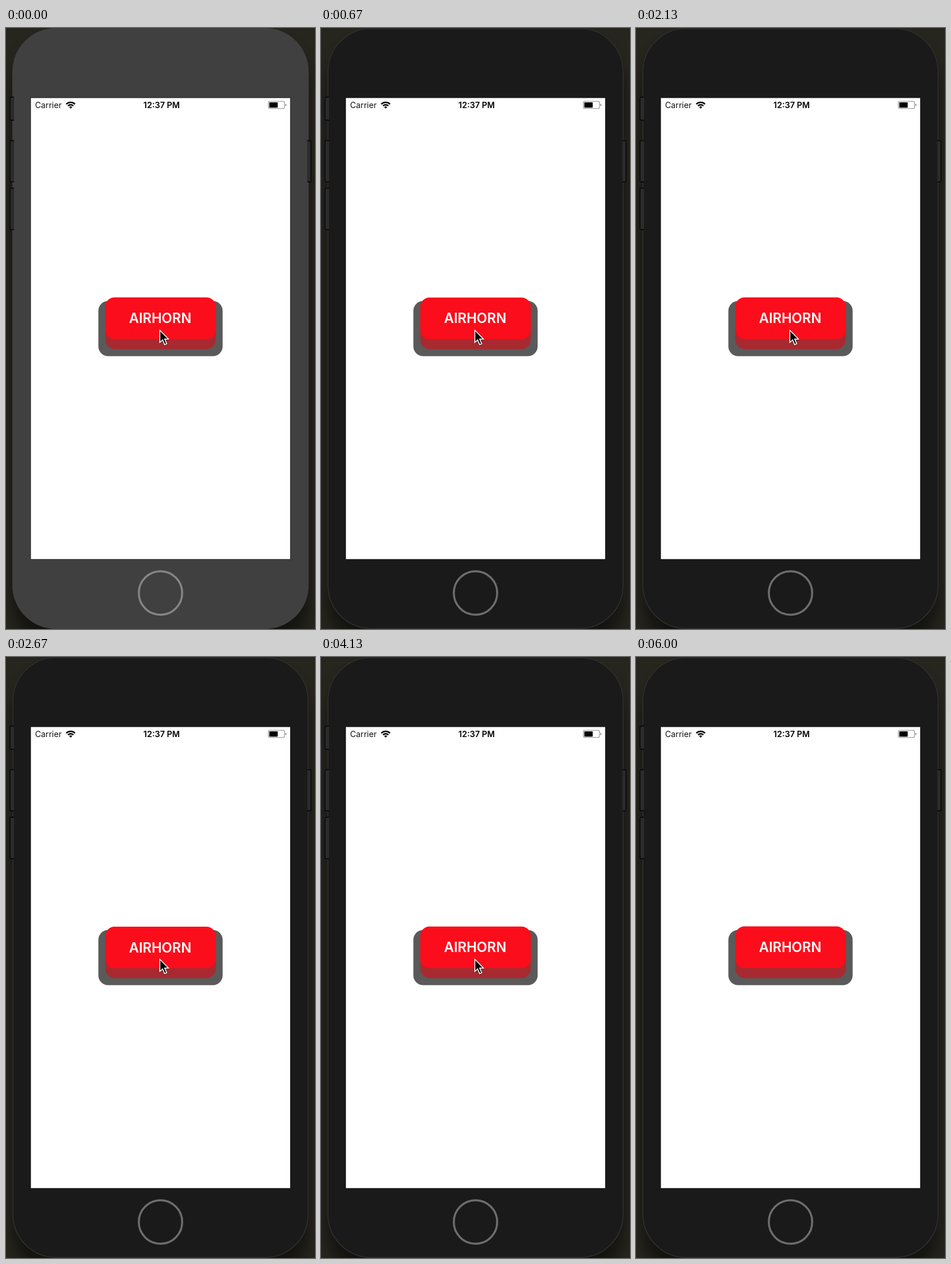
An HTML page for the animation above (6140 ms loop, 537x1043 px).

```html
<!DOCTYPE html>
<html lang="en">
<head>
<meta charset="utf-8">
<title>Airhorn button</title>
<style>
  html, body { margin: 0; width: 100%; height: 100%; overflow: hidden; background: #25241c; }
  svg { display: block; width: 100%; height: 100%; }
  text { font-family: Inter, "Liberation Sans", sans-serif; }
</style>
</head>
<body>
<svg viewBox="0 0 537 1043" xmlns="http://www.w3.org/2000/svg">
  <defs>
    <filter id="soft" x="-10%" y="-10%" width="120%" height="120%"><feGaussianBlur stdDeviation="14"/></filter>
    <filter id="drop" x="-50%" y="-50%" width="200%" height="200%">
      <feDropShadow dx="0" dy="1.2" stdDeviation="1.2" flood-color="#000" flood-opacity=".4"/>
    </filter>
  </defs>

  <rect width="537" height="1043" fill="#27261e"/>
  <rect x="11" y="30" width="515" height="1043" rx="76" fill="#000" opacity=".5" filter="url(#soft)"/>

  <!-- phone body -->
  <rect x="11" y="0" width="515" height="1043" rx="76" fill="#1a1a1a"/>
  <rect x="12" y="1" width="513" height="1041" rx="75" fill="none" stroke="#303030" stroke-width="1.6"/>
  <circle cx="268.5" cy="980.5" r="37.7" fill="none" stroke="#6d6d6d" stroke-width="3.5"/>
  <g id="glow">
    <rect x="11" y="0" width="515" height="1043" rx="76" fill="#404040"/>
    <circle cx="268.5" cy="980.5" r="37.7" fill="none" stroke="#858585" stroke-width="3.5"/>
  </g>
  <g fill="#2b2b2b" stroke="#050505" stroke-width="1.3">
    <path d="M14 120H9q-2 0-2 2v36q0 2 2 2h5"/>
    <path d="M14 195.5H9q-2 0-2 2v67.500q0 2 2 2h5"/>
    <path d="M14 278H9q-2 0-2 2v68q0 2 2 2h5"/>
    <path d="M523.500 195.500h4.500q2 0 2 2v67.500q0 2-2 2h-4.500"/>
  </g>

  <!-- screen and status bar -->
  <rect x="42.500" y="120.500" width="452" height="802" fill="#151515"/>
  <rect x="43.300" y="121.500" width="450.500" height="800.200" fill="#fff"/>
  <text x="50.500" y="138.800" font-size="14.200" fill="#111">Carrier</text>
  <g fill="none" stroke="#000" stroke-width="2.500">
    <path d="M104.800 132.200a10.800 10.800 0 0 1 15.200 0"/>
    <path d="M107.700 135.200a6.700 6.700 0 0 1 9.400 0"/>
  </g>
  <path d="M109.800 137.200a3.900 3.900 0 0 1 5.200 0l-2.600 2.700z"/>
  <text x="270.500" y="138.800" font-size="14.400" font-weight="600" text-anchor="middle" fill="#000">12:37 PM</text>
  <rect x="456" y="127.300" width="28" height="12.500" rx="2.500" fill="#fff" stroke="#8a8a8a" stroke-width="1.100"/>
  <rect x="457.600" y="128.900" width="14.600" height="9.300" rx="1"/>
  <path d="M485.600 131.500q1.700 .6 1.700 2.100t-1.700 2.100z" fill="#777"/>

  <!-- airhorn button -->
  <rect x="160.500" y="473.800" width="216" height="95.800" rx="17" fill="#5a5a5a"/>
  <rect x="172.500" y="485.500" width="192" height="72" rx="17" fill="#a82a30"/>
  <g id="cap">
    <rect x="172.500" y="467.500" width="192" height="72" rx="16" fill="#fc0d1b"/>
    <text x="268" y="512.200" font-size="23.700" font-weight="600" text-anchor="middle" fill="#fff">AIRHORN</text>
  </g>

  <path id="pointer" d="M.4 1.600V22.600L5.200 18.200 8.700 26.400 12.200 24.900 8.700 16.800H15.200Z"
    fill="#000" stroke="#fff" stroke-width="1.500" filter="url(#drop)"/>
</svg>

<script>
const LOOP = 6140, TRAVEL = 18, MOVE_TICKS = 3.75;
const glow = document.getElementById('glow');
const cap = document.getElementById('cap');
const pointer = document.getElementById('pointer');

// Ticks (15 per second) at which the button alternately goes down and up.
const toggles = [10, 19, 24, 28, 33, 37, 45, 53, 62, 66];

// Pointer stops: tick, x, y.
const stops = [[0, 267, 523], [67, 267, 523], [69, 404, 445], [70, 409, 470],
  [74, 409, 470], [79, 180, 934]];
const GONE = 80;

const clamp = v => Math.max(0, Math.min(1, v));
const lerp = (a, b, p) => a + (b - a) * p;

// Equals cubic-bezier(.42, 0, .58, 1).
function easeInOut(x) {
  let lo = 0, hi = 1;
  for (let i = 0; i < 20; i++) {
    const s = (lo + hi) / 2, r = 1 - s;
    if (1.26 * s * r * r + 1.74 * s * s * r + s * s * s < x) lo = s; else hi = s;
  }
  return lo * lo * (3 - 2 * lo);
}

function tickAt(t) {
  let k = Math.ceil(t * 0.015) + 1;
  while (Math.round(k * 20 / 3) * 10 > t) k--;
  return k;
}

function pressAt(k) {
  const count = toggles.filter(s => s <= k).length;
  if (!count) return 0;
  const x = clamp((k - toggles[count - 1] + 0.3) / MOVE_TICKS);
  const p = x >= 1 ? 1 : easeInOut(x);
  return count % 2 ? p : 1 - p;
}

function pointerAt(k) {
  const i = stops.findIndex(s => s[0] > k);
  if (i < 0) return stops[stops.length - 1].slice(1);
  const [k0, x0, y0] = stops[i - 1], [k1, x1, y1] = stops[i];
  const p = (k - k0) / (k1 - k0);
  return [lerp(x0, x1, p), lerp(y0, y1, p)];
}

function draw(t) {
  const k = tickAt(t);
  glow.setAttribute('opacity', clamp(1 - (k - 2) / 5));
  cap.setAttribute('transform', `translate(0 ${TRAVEL * pressAt(k)})`);
  pointer.setAttribute('transform', `translate(${pointerAt(k)})`);
  pointer.setAttribute('visibility', k < GONE ? 'visible' : 'hidden');
}

const start = performance.now();
function loop() {
  draw((performance.now() - start) % LOOP);
  requestAnimationFrame(loop);
}
loop();
</script>
</body>
</html>
```
